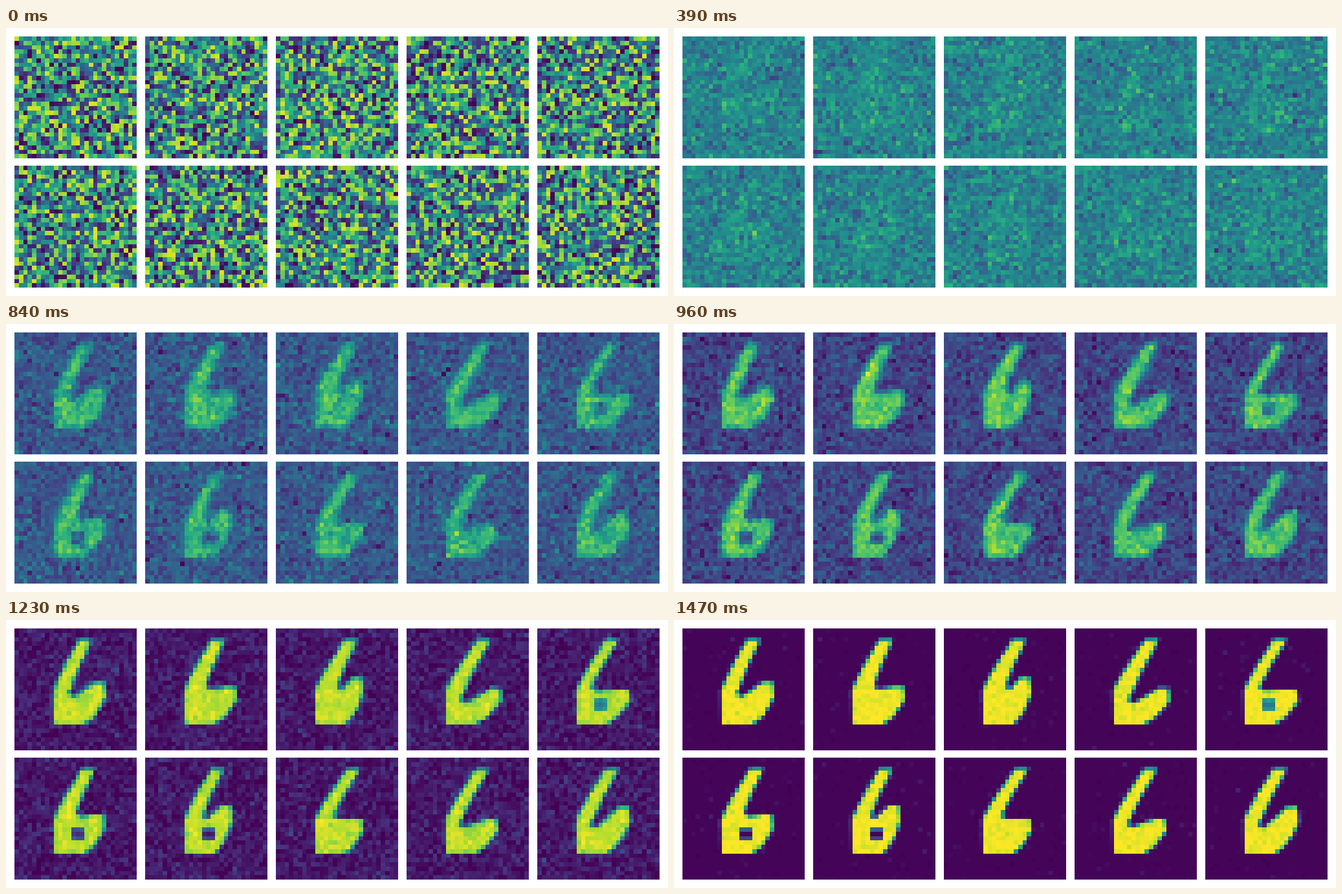
An HTML page with a canvas for the animation above (1500 ms loop, 1175 px wide and 477 px high).

```html
<!DOCTYPE html>
<html lang="en">
<head>
<meta charset="utf-8">
<title>Digits from noise</title>
<style>
html, body { margin: 0; width: 100%; height: 100%; overflow: hidden; background: #fff; }
canvas { display: block; }
</style>
</head>
<body>
<canvas id="stage" width="1175" height="477"></canvas>
<script>
const N = 28, CELLS = N * N, SIZE = 217;
const STEP = 30, STEPS = 50;

// Key points of each six, in cells
const SIXES = [
  { top: 16.3, crotch: [12.4, 15], tip: [21, 12.2] },
  { top: 16.7, crotch: [13.8, 13.3], tip: [21, 13.2] },
  { top: 17.3, crotch: [14, 13.3], tip: [20, 11.2] },
  { top: 17.8, crotch: [12.3, 16.6], tip: [21.8, 13.7] },
  { top: 17.2, crotch: [12.3, 13.6], tip: [21.2, 13.9], hole: .6 },
  { top: 17, crotch: [14, 12.8], tip: [20.8, 13], hole: 1 },
  { top: 16.7, crotch: [13, 13.4], tip: [20, 11], hole: 1 },
  { top: 17.9, crotch: [13.1, 13.3], tip: [20.1, 14] },
  { top: 17.5, crotch: [12, 15.3], tip: [21, 14] },
  { top: 17.2, crotch: [12.1, 15.6], tip: [21.3, 11.2] }
];

const VIRIDIS = ['440154', '472d7b', '3b528b', '2c728e', '21918c', '28ae80', '5ec962', 'addc30', 'fde725']
  .map(h => [0, 2, 4].map(i => parseInt(h.slice(i, i + 2), 16)));

const lerp = (a, b, f) => a + (b - a) * f;
const clamp = v => Math.min(1, Math.max(0, v));
const grid = (fn, size = CELLS) => Float32Array.from({ length: size }, (_, i) => fn(i));

let seed = 20611;
function random() {
  seed = seed + 0x6D2B79F5 | 0;
  let r = Math.imul(seed ^ seed >>> 15, 1 | seed);
  r = r + Math.imul(r ^ r >>> 7, 61 | r) ^ r;
  return ((r ^ r >>> 14) >>> 0) / 4294967296;
}
const gauss = () => Math.sqrt(-2 * Math.log(1 - random())) * Math.cos(2 * Math.PI * random());

const ctx = document.getElementById('stage').getContext('2d');
ctx.imageSmoothingEnabled = false;
const tile = document.createElement('canvas');
tile.width = tile.height = N;
const tctx = tile.getContext('2d', { willReadFrequently: true });

// Coverage of every cell by one digit
function rasterize({ top, crotch: [cx, cy], tip: [rx, ry], hole = 0 }) {
  const left = 8.9, base = 22, topY = 2.5, foot = 16;
  tctx.clearRect(0, 0, N, N);
  tctx.beginPath();
  tctx.moveTo(top - 1.5, topY);
  tctx.lineTo(top + 1.5, topY);
  tctx.quadraticCurveTo(lerp(cx, top + 1.5, .38), lerp(cy, topY, .45), cx, cy);
  tctx.lineTo(cx + 1.2, cy + .7);
  tctx.lineTo(rx - 2.6, ry);
  tctx.lineTo(rx - .3, ry);
  tctx.lineTo(rx, lerp(ry, base, .35));
  tctx.quadraticCurveTo(lerp(rx, foot, .35), 20, foot, base);
  tctx.lineTo(9, base);
  tctx.lineTo(left, 14);
  tctx.quadraticCurveTo(lerp(left, top, .22), 10, top - 1.5, topY);
  tctx.fill();
  tctx.globalCompositeOperation = 'destination-out';
  tctx.globalAlpha = hole;
  tctx.fillRect(13, 16.3, 3, 2.5);
  tctx.globalCompositeOperation = 'source-over';
  tctx.globalAlpha = 1;
  const { data } = tctx.getImageData(0, 0, N, N);
  return grid(i => data[i * 4 + 3] / 255);
}

// Digits never touch the border, so neighbours need no bounds check
function blur(src) {
  return src.map((_, i) => {
    let sum = 0;
    for (let dy = -1; dy < 2; dy++) for (let dx = -1; dx < 2; dx++)
      sum += (src[i + dy * N + dx] || 0) * (2 - Math.abs(dx)) * (2 - Math.abs(dy));
    return sum / 16;
  });
}

const panels = SIXES.map((six, i) => {
  const sharp = rasterize(six);
  return {
    x: 15 + i % 5 * 232,
    y: i < 5 ? 15 : 245,
    sharp,
    soft: blur(sharp).map(v => v ** 1.5),
    start: grid(() => random() - .5)
  };
});

const bowl = grid(i => Math.exp(-((i % N - 15) ** 2 + ((i / N | 0) - 16.5) ** 2) / 7));

// Slowly drifting noise, one field per step
const fields = [];
for (let k = 0; k < STEPS; k++) {
  const prev = fields[k - 1];
  fields.push(grid(i => prev ? .75 * prev[i] + .66 * gauss() : gauss(), CELLS * panels.length));
}

const palette = Array.from({ length: 256 }, (_, i) => {
  const s = i / 255 * 8, j = Math.min(7, s | 0);
  return VIRIDIS[j].map((c, n) => Math.round(lerp(c, VIRIDIS[j + 1][n], s - j)));
});

const image = tctx.createImageData(N, N);
image.data.fill(255);

function draw(step) {
  const t = step * STEP, p = step / (STEPS - 1);
  const fade = (1 + Math.cos(Math.PI * p ** 1.4)) / 2;
  const paper = .01 + .46 * fade;
  const ink = .98 - .49 * fade;
  const sharpness = (1 - fade) ** 1.5;
  const start = .96 * Math.exp(-((t / 140) ** 2));
  const amount = .09 * (1 - Math.exp(-t / 60)) * (1 - .5 * sharpness);
  const cut = 10 * Math.max(0, p - .84);

  ctx.fillStyle = '#fff';
  ctx.fillRect(0, 0, 1175, 477);
  panels.forEach((panel, n) => {
    for (let i = 0; i < CELLS; i++) {
      const m = lerp(panel.soft[i], panel.sharp[i], sharpness);
      const z = fields[step][n * CELLS + i];
      const noise = Math.sign(z) * Math.max(0, Math.abs(z) - cut * (1 - m)) * amount * (1 - .4 * sharpness * m);
      const v = lerp(paper, ink, m * (1 - .45 * fade * bowl[i])) + noise + start * panel.start[i];
      image.data.set(palette[Math.round(clamp(v) * 255)], i * 4);
    }
    tctx.putImageData(image, 0, 0);
    ctx.drawImage(tile, panel.x, panel.y, SIZE, SIZE);
  });
}

const origin = performance.now();
let shown = -1;
function tick() {
  const step = Math.floor((performance.now() - origin) / STEP) % STEPS;
  if (step !== shown) draw(shown = step);
  requestAnimationFrame(tick);
}
tick();
</script>
</body>
</html>
```
